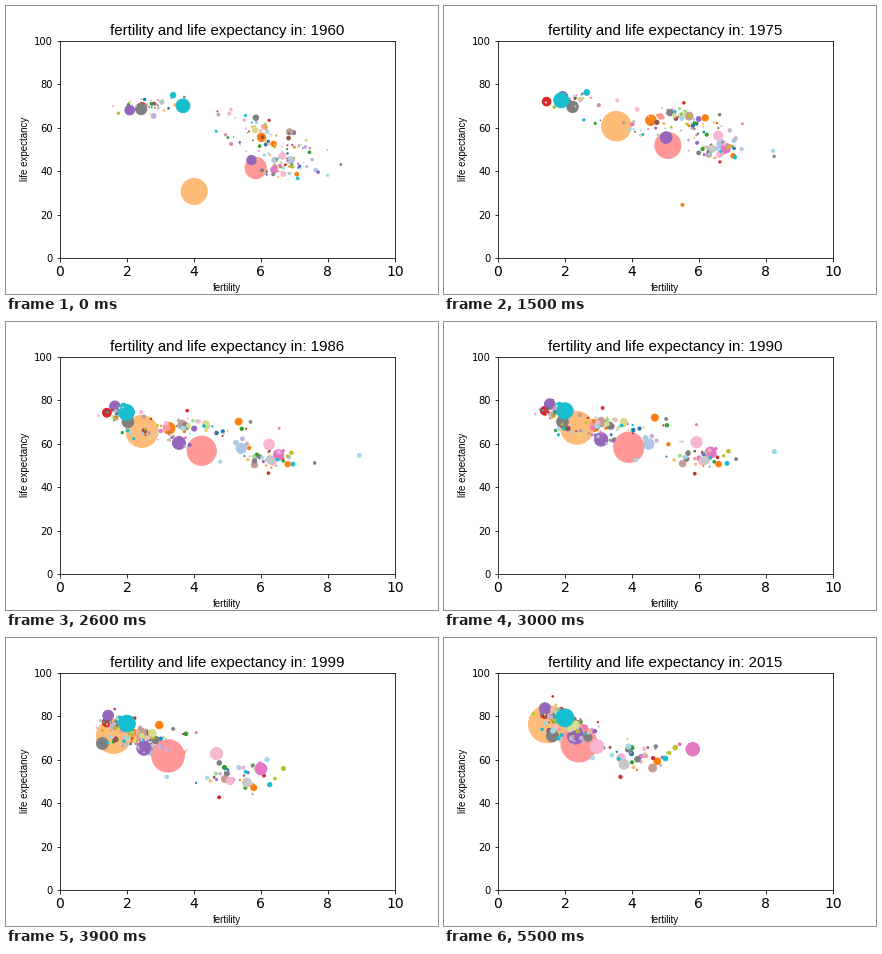
Animation of 432 by 288 pixels, one loop 5600 ms. Source, as a matplotlib script:

```python
import numpy as np
import matplotlib.pyplot as plt
from matplotlib.animation import FuncAnimation

FIRST, LAST = 1960, 2015
YEARS = np.arange(FIRST, LAST + 1)
RISE = (YEARS - FIRST) / (LAST - FIRST)
COLORS = plt.get_cmap("tab20").colors

world = []


def bell(year, width):
    return np.exp(-((YEARS - year) / width) ** 2)


def nation(shade, pop, growth, fert, turn, life, pace=6, bend=0.7):
    """Births fall on an S-curve around `turn`; life climbs along a power curve."""
    high, low = fert
    born, grown = life
    fall = 1 / (1 + np.exp(-(YEARS - turn) / pace))
    item = dict(
        shade=shade,
        size=pop * (1 + (growth - 1) * RISE),
        fert=high + (low - high) * fall,
        life=born + (grown - born) * RISE ** bend,
    )
    world.append(item)
    return item


def rich(shade, pop):
    nation(shade, pop, 1.3, (rng.normal(2.7, 0.45), rng.normal(1.6, 0.22)),
           rng.normal(1974, 4), (rng.normal(69.5, 2.2), rng.normal(80, 2.5)), 4, 1.1)


def rising(shade, pop):
    high = rng.normal(6.35, 0.75)
    born = rng.normal(55 - 5 * (high - 6.35), 5)
    nation(shade, pop, 2.2, (high, rng.normal(2.15, 0.4)),
           rng.normal(1983, 8), (born, rng.normal(74.5, 3)))


def late(shade, pop):
    item = nation(shade, pop, 3.3, (rng.normal(6.75, 0.4), rng.normal(4, 0.6)),
                  rng.normal(1999, 5), (rng.normal(41, 3.5), rng.normal(62, 3.5)))
    item["life"] -= rng.uniform(0, 10) * bell(2000, 8)


# Small countries of every colour
rng = np.random.default_rng(11)
for shade in range(20):
    for kind in [rich] * 2 + [rising] * 4 + [late] * 2:
        kind(shade, min(30, 2.5 * np.exp(rng.normal(0, 1.3))))

# The largest countries
nation(1, 50, 3.2, (6.9, 2.1), 1990, (45, 72), pace=5, bend=1)
nation(2, 72, 2.9, (6.9, 1.5), 1978, (55.5, 75), pace=11)
china = nation(3, 680, 2.05, (6.4, 1.45), 1972.6, (50, 76.3), pace=7.6)
nation(6, 73, 1.1, (2.5, 1.4), 1967.5, (69.5, 81), pace=2.5, bend=1.2)
nation(7, 450, 2.9, (6.4, 1.9), 1987, (41.4, 67.2), pace=13.75)
nation(8, 88, 2.9, (5.8, 2.3), 1982.5, (45, 70.8))
nation(8, 93, 1.35, (2.1, 1.4), 1982, (68, 83.5))
nation(11, 38, 3.3, (7, 2.2), 1981, (58, 76))
nigeria = nation(12, 45, 4, (6.9, 5.8), 1990, (40.5, 64.8))
nation(13, 46, 4.1, (6.65, 2.7), 1999, (47, 66), bend=0.55)
russia = nation(14, 125, 1.15, (2.6, 1.5), 1985, (68.5, 71), pace=15)
states = nation(18, 187, 1.7, (3.95, 2), 1964.5, (70, 79.2), pace=2.5, bend=1)

# Famines, wars and other short swings
china["fert"] += 0.48 * bell(1989, 4) - 1.6 * bell(1960, 1)
china["life"] -= 19.4 * bell(1960, 2)
nigeria["fert"] -= 0.5 * bell(1960, 8)
nigeria["life"] -= 4 * bell(2000, 7)
russia["fert"] -= 0.6 * bell(2001, 6.5)
russia["life"] -= 3.8 * bell(2002, 6.5)
states["fert"] -= 0.2 * bell(1978, 5)

cambodia = nation(2, 6, 2.6, (6.6, 2.6), 1993, (42, 69))
cambodia["fert"] -= 0.9 * bell(1975, 4)
cambodia["life"] -= 36 * bell(1976.7, 3.5)
rwanda = nation(14, 3, 3.7, (8.4, 4.6), 1994, (43, 66), bend=1.4)
rwanda["life"] -= 40 * bell(1994, 1)
yemen = nation(19, 5, 5, (8, 3.5), 2001, (38, 66))
yemen["fert"] += 1.3 * bell(1985, 8)

world.sort(key=lambda c: c["shade"])
size, fert, life = (np.array([c[k] for c in world]) for k in ("size", "fert", "life"))

fig = plt.figure(figsize=(6, 4), dpi=72, facecolor="white")
fig.subplots_adjust(left=0.125, right=0.9, bottom=0.125, top=0.88)
ax = fig.add_subplot()
dots = ax.scatter(fert[:, 0], life[:, 0], s=size[:, 0],
                  c=[COLORS[c["shade"]] for c in world])
ax.set(xlim=(0, 10), ylim=(0, 100))
ax.tick_params(axis="x", labelsize=14)
ax.tick_params(axis="y", labelsize=10)
ax.set_xlabel("fertility", family="Liberation Sans", size=9.8)
ax.set_ylabel("life expectancy", family="Liberation Sans", size=9.8)
title = ax.set_title("", family="Liberation Sans", size=15)


def draw(i):
    dots.set_offsets(np.column_stack([fert[:, i], life[:, i]]))
    dots.set_sizes(size[:, i])
    title.set_text(f"fertility and life expectancy in: {YEARS[i]}")
    return dots, title


anim = FuncAnimation(fig, draw, frames=len(YEARS), interval=100, repeat=True)
plt.show()
```
